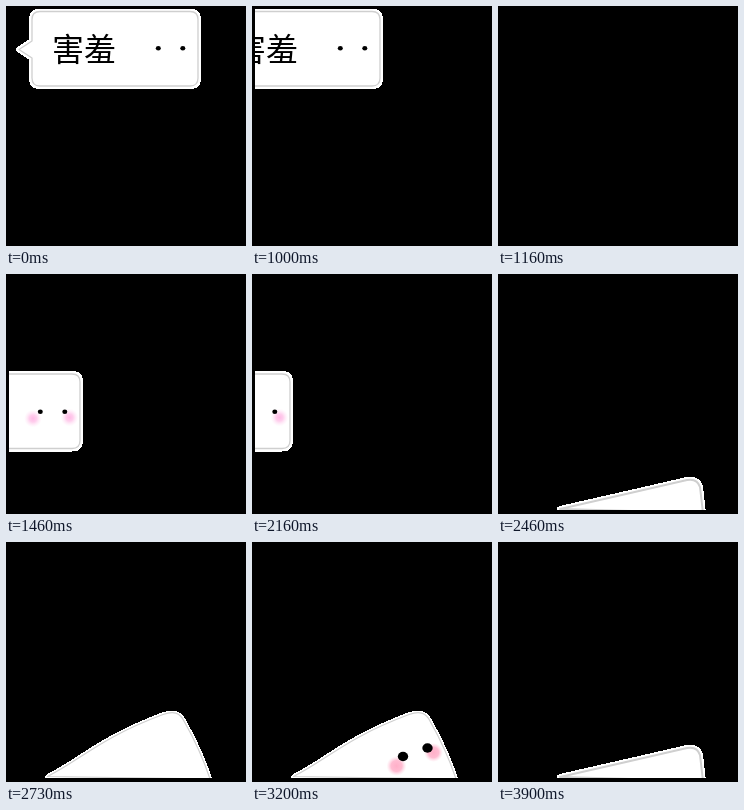
Write an HTML page that moves like this. It is 240 px wide and 240 px high and loops after 3970 ms.

```html
<!DOCTYPE html>
<html lang="zh">
<head>
<meta charset="utf-8">
<title>害羞</title>
<style>
  html, body { margin: 0; width: 100%; height: 100%; overflow: hidden; background: #000; }
  svg { display: block; width: 100vw; height: 100vh; }
  text { font: 32px "Noto Sans CJK SC", "Noto Sans CJK", sans-serif; }
  .rim { fill: #fff; stroke: #fff; stroke-linejoin: round; shape-rendering: crispEdges; }
  .line { fill: none; stroke: #cfcfcf; stroke-linejoin: round; }
</style>
</head>
<body>
<svg viewBox="0 0 240 240">
  <defs>
    <clipPath id="stage"><rect x="3" y="2" width="234" height="234"/></clipPath>
    <radialGradient id="pink">
      <stop offset="0" stop-color="#ffb9e6"/>
      <stop offset=".4" stop-color="#ffc6ea" stop-opacity=".85"/>
      <stop offset="1" stop-color="#ffe6f6" stop-opacity="0"/>
    </radialGradient>
    <radialGradient id="rose">
      <stop offset="0" stop-color="#ffafc8"/>
      <stop offset=".55" stop-color="#ffb5cd" stop-opacity=".9"/>
      <stop offset="1" stop-color="#ffd6e3" stop-opacity="0"/>
    </radialGradient>
    <path id="outline" d="M34 5.5H184Q192 5.5 192 13.5V72Q192 80 184 80H34Q26 80 26 72V52L13 43.5L26 35V13.5Q26 5.5 34 5.5Z"/>
  </defs>
  <g clip-path="url(#stage)">
    <g id="bubble">
      <use href="#outline" class="rim" stroke-width="6"/>
      <use href="#outline" class="line" stroke-width="1.3"/>
      <text id="label" x="46" y="55">害羞</text>
      <g id="cheeks" fill="url(#pink)">
        <circle cx="145" cy="50" r="9"/>
        <circle cx="181.5" cy="49" r="9"/>
      </g>
      <g id="dots">
        <ellipse cx="152.3" cy="42.3" rx="2.5" ry="2.2"/>
        <ellipse cx="176.8" cy="42.3" rx="2.5" ry="2.2"/>
      </g>
    </g>
    <g id="ghost">
      <path id="rim" class="rim"/>
      <path id="line" class="line"/>
      <g id="blush" fill="url(#rose)">
        <circle cx="144.5" cy="224" r="10"/>
        <circle cx="181.5" cy="210.5" r="9.5"/>
      </g>
      <ellipse class="eye" cx="151" cy="214.5" rx="5.2"/>
      <ellipse class="eye" cx="175.5" cy="206" rx="5.2"/>
    </g>
  </g>
</svg>
<script>
const LOOP = 3970;
const $ = id => document.getElementById(id);
const eyes = document.querySelectorAll('.eye');

// Body outline: start point, then curves for the slope, the peak and the right side
const LOW  = [62, 235, 104, 225.5, 147, 215.7, 189, 206,
              197, 204.5, 200.5, 208, 202, 213, 203, 221, 204, 230, 205, 239];
const HIGH = [41.5, 234.5, 76, 217, 94, 196, 157, 172.5,
              167, 169, 174, 170, 178.5, 180, 187, 195, 196, 213, 204, 237];

// Each row: start time, then the state held until the next row
const slide = [[0, 0, 0], [1000, -64, 0], [1080, -128, 0], [1160, null],
               [1360, -154, 94.5], [1460, -118, 94.5], [2160, -154, 94.5], [2260, null]];
const rise = [[0, null], [2460, 0], [2530, 1 / 3], [2630, 2 / 3], [2730, 1], [3900, 0]];
const face = [[0, 0], [3030, 1 / 3], [3100, 2 / 3], [3200, 1], [3900, 0]];

const at = (rows, t) => rows.filter(r => r[0] <= t).pop().slice(1);
const mix = (a, b, k) => a + (b - a) * k;
const show = (el, on) => el.setAttribute('display', on ? 'inline' : 'none');

function drawBubble(t) {
  const [x, y] = at(slide, t);
  show($('bubble'), x !== null);
  if (x === null) return;
  $('bubble').setAttribute('transform', `translate(${x} ${y})`);
  show($('label'), y === 0);
  show($('cheeks'), y > 0);
  $('dots').setAttribute('transform', `translate(0 ${y ? 0.9 : 0})`);
}

function drawGhost(t) {
  const [k] = at(rise, t), [f] = at(face, t);
  show($('ghost'), k !== null);
  if (k === null) return;
  const p = LOW.map((v, i) => mix(v, HIGH[i], k));
  const d = `M${p.slice(0, 2)}C${p.slice(2)}Z`;
  $('rim').setAttribute('d', d);
  $('line').setAttribute('d', d);
  $('rim').setAttribute('stroke-width', mix(6, 4.4, k));
  $('line').setAttribute('stroke-width', mix(2, 1.2, k));
  $('blush').setAttribute('opacity', f);
  eyes.forEach(e => e.setAttribute('ry', 4.7 * f));
}

function render(t) {
  drawBubble(t);
  drawGhost(t);
}

const start = performance.now();
function tick() {
  render((performance.now() - start) % LOOP);
  requestAnimationFrame(tick);
}
tick();
</script>
</body>
</html>
```
